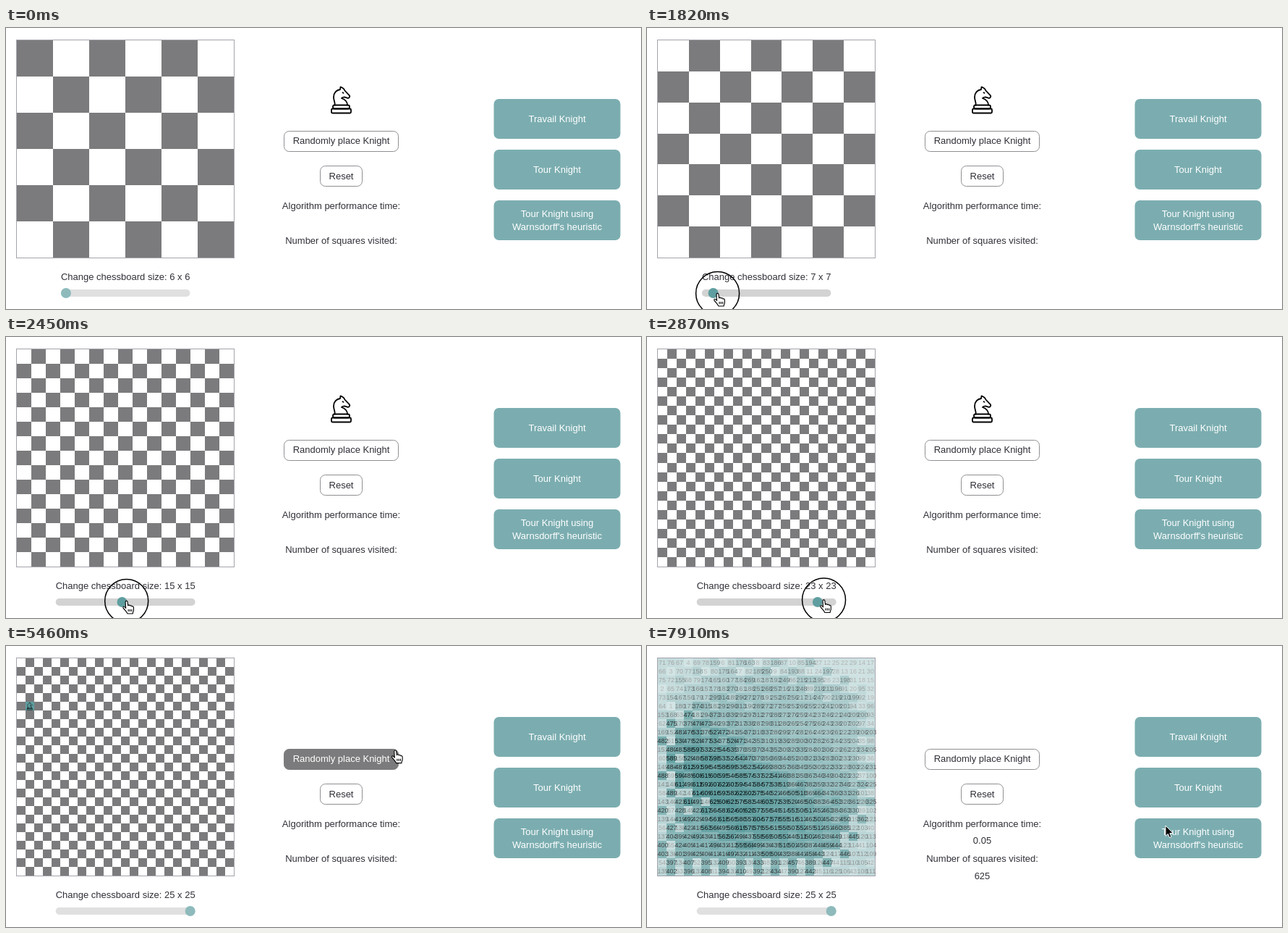
Write an HTML page that moves like this. It is 878 px wide and 388 px high and loops after 8 s.

```html
<!DOCTYPE html>
<html lang="en">
<head>
<meta charset="utf-8">
<title>Knight's tour</title>
<style>
html, body { margin: 0; width: 100%; height: 100%; overflow: hidden; background: #fff; }
svg { display: block; width: 878px; height: 388px; font: 13px "Liberation Sans", Arial, sans-serif; }
text { text-anchor: middle; fill: #303038; }
.number { font-size: 9px; fill: #000; }
.white { fill: #fff; }
.outline { fill: #fff; stroke: #8f8f94; }
</style>
</head>
<body>
<svg id="stage" viewBox="0 0 878 388">
  <defs>
    <g id="knight" fill="none" stroke="#000" stroke-width="1.8" stroke-linejoin="round" stroke-linecap="round">
      <path d="M6 26C7 22 4.500 20 4.500 15C4.500 9 8.500 5 13.500 4.500L14 .9C17 1.800 19 3.500 20 6L26.500 12.800C27.500 14.500 25.500 17 23.500 16.200L19.500 14.800C17.500 14.800 16.500 15.500 15.500 16.500C20 18 23.500 21 23.500 26"/>
      <path d="M17 8.800L18 9.300"/>
      <rect x="3.500" y="26" width="23" height="5" rx="2.300"/>
      <rect x="1.500" y="31" width="27" height="6" rx="1.500"/>
    </g>
  </defs>
  <rect x="14.500" y="16.500" width="301" height="301" fill="#fff" stroke="#a3a3ac"/>
  <path id="checks" fill="#7b7b7d"/>
  <g id="placed">
    <rect x="27" y="77" width="12" height="12" fill="#5f9ea0"/>
    <use href="#knight" transform="translate(28.500 77.700) scale(.29)"/>
  </g>
  <g id="tour"></g>

  <text id="sizeLabel" x="165.200" y="347.500"></text>
  <g id="slider">
    <rect id="track" y="361" height="10" rx="5" fill="#d3d3d3"/>
    <circle id="thumb" cy="366" r="7" fill="#5f9ea0"/>
  </g>

  <use id="spare" href="#knight" x="448.500" y="80.500"/>
  <rect id="placeBox" class="outline" x="384.500" y="142.500" width="158" height="28" rx="7"/>
  <text id="placeText" x="463.500" y="160.300">Randomly place Knight</text>
  <rect class="outline" x="434.500" y="190.500" width="58" height="28" rx="7"/>
  <text x="463.500" y="208.800">Reset</text>
  <text x="463.500" y="249.500">Algorithm performance time:</text>
  <text x="463.500" y="298">Number of squares visited:</text>
  <g id="results">
    <text x="463.500" y="273">0.05</text>
    <text x="463.500" y="321.500">625</text>
  </g>

  <g fill="#7badb0">
    <rect x="674.500" y="98" width="175" height="55" rx="7"/>
    <rect x="674.500" y="168" width="175" height="55" rx="7"/>
    <rect x="674.500" y="238" width="175" height="55" rx="7"/>
    <rect id="hover" x="674.500" y="238" width="175" height="55" rx="7" fill="#5b9a9d"/>
  </g>
  <text class="white" x="762" y="129.500">Travail Knight</text>
  <text class="white" x="762" y="199.500">Tour Knight</text>
  <text class="white" x="762" y="260.500">Tour Knight using</text>
  <text class="white" x="762" y="278.500">Warnsdorff's heuristic</text>

  <g id="pointer">
    <circle id="ring" fill="none" stroke="#000" stroke-width="1.500"/>
    <path id="arrow" d="M0 0V14.500L3.300 11.400 5.600 16.600 8 15.600 5.800 10.500H10.300Z" stroke="#fff"/>
    <g id="hand" stroke="#000" stroke-width="1.100" stroke-linejoin="round">
      <path fill="#fff" d="M-1.600 1.400C-1.600-.6 1.200-.6 1.400 1.400L2 6.500C2.600 5.200 4.600 5.400 4.800 6.800 5.600 5.800 7.300 6.200 7.400 7.600 8.400 7 9.800 7.600 9.800 9V12.500C9.800 14.500 8.600 15 8.600 17.500H1.200C.8 15.500-2.600 12.500-4.600 9.600-5.600 8-3.600 7-2.400 8.400L-1 10Z"/>
      <path d="M2.500 11.500V14.500M4.800 11.500V14.500M7.100 11.500V14.500"/>
    </g>
  </g>
</svg>
<script>
const LOOP = 8000, PLACED = 4880, SOLVED = 6580;
const el = {};
document.querySelectorAll('[id]').forEach(node => el[node.id] = node);

// Each track is a list of [time, value, ...].
const CURSOR = [
  [210, 172, 386], [350, 130, 357], [490, 82, 353], [600, 75, 366], [700, 92, 371], [910, 93, 372],
  [1050, 90, 371], [1190, 83, 366], [1670, 83, 366], [1820, 97.5, 366.5], [2450, 166.5, 364.5],
  [2870, 244.5, 363], [3220, 262, 362], [3430, 264, 362], [3570, 267, 360], [3710, 267, 360],
  [3900, 300, 336], [4150, 410, 250], [4380, 506, 167], [4550, 527, 151], [5390, 527, 151],
  [5460, 538, 144], [5620, 592, 164], [5820, 660, 226], [6000, 704, 244], [6160, 717, 248]
];
const SIZE = [[1670, 6], [1820, 7], [2450, 15], [2870, 23], [3220, 25]];
const RING = [
  [1190, 0], [1330, 30], [3300, 30], [3360, 23], [3500, 0],
  [4790, 0], [4880, 25], [4970, 0], [6390, 0], [6480, 29], [6610, 0]
];
const SLIDER_GLOW = [[490, .7], [690, 1], [3430, 1], [3570, .7]];
const BUTTON_GLOW = [[5860, 0], [6060, 1], [SOLVED, 1], [6930, 0]];

function sample(track, t) {
  const next = track.findIndex(key => key[0] > t);
  if (next === 0) return track[0].slice(1);
  if (next < 0) return track[track.length - 1].slice(1);
  const a = track[next - 1], b = track[next];
  const f = (t - a[0]) / (b[0] - a[0]);
  return a.slice(1).map((v, i) => v + (b[i + 1] - v) * f);
}

const edge = (i, n) => Math.round(i * 300 / n);

function checkerboard(n) {
  let d = '';
  for (let row = 0; row < n; row++)
    for (let col = n + row & 1; col < n; col += 2)
      d += `M${15 + edge(col, n)} ${17 + edge(row, n)}H${15 + edge(col + 1, n)}V${17 + edge(row + 1, n)}H${15 + edge(col, n)}Z`;
  return d;
}

// Warnsdorff's rule: always step to the free square with the fewest onward moves.
function knightsTour(n, x, y) {
  const jumps = [[2, -1], [2, 1], [-2, -1], [-2, 1], [1, -2], [1, 2], [-1, -2], [-1, 2]];
  const order = Array.from({ length: n }, () => Array(n).fill(0));
  const moves = (px, py) => jumps.map(([dx, dy]) => [px + dx, py + dy])
    .filter(([cx, cy]) => order[cy] && order[cy][cx] === 0);
  for (let step = 1; ; step++) {
    order[y][x] = step;
    let best = null, fewest = 9;
    for (const move of moves(x, y)) {
      const onward = moves(...move).length;
      if (onward < fewest) { fewest = onward; best = move; }
    }
    if (!best) return order;
    [x, y] = best;
  }
}

function drawTour(n) {
  let cells = '';
  knightsTour(n, 1, 5).forEach((line, row) => line.forEach((step, col) => {
    if (!step) return;
    const x = 15 + edge(col, n), y = 17 + edge(row, n);
    const anchor = step > 99 ? `x="${x - .5}" style="text-anchor:start"` : `x="${x + 6}"`;
    cells += `<g opacity="${(.27 + .73 * step / (n * n)).toFixed(3)}">` +
      `<rect x="${x}" y="${y}" width="12" height="12" fill="#5f9ea0"/>` +
      `<text class="number" ${anchor} y="${y + 9}">${step}</text></g>`;
  }));
  el.tour.innerHTML = cells;
}

const show = (node, on) => node.setAttribute('display', on ? 'inline' : 'none');
const set = (node, attrs) => Object.entries(attrs).forEach(([k, v]) => node.setAttribute(k, v));
let shownSize = 0;

function drawSize(n) {
  if (n === shownSize) return;
  shownSize = n;
  const width = n < 10 ? 178.5 : 193, left = 165.2 - width / 2;
  set(el.checks, { d: checkerboard(n) });
  el.sizeLabel.textContent = `Change chessboard size: ${n} x ${n}`;
  set(el.track, { x: left, width });
  set(el.thumb, { cx: left + 7 + (n - 6) / 19 * (width - 14) });
}

function render(t) {
  drawSize(Math.round(sample(SIZE, t)[0]));
  set(el.slider, { opacity: sample(SLIDER_GLOW, t)[0] });

  const solved = t >= SOLVED, placed = t >= PLACED;
  show(el.spare, !placed);
  show(el.placed, placed && !solved);
  show(el.checks, !solved);
  show(el.tour, solved);
  show(el.results, solved);

  const [x, y] = sample(CURSOR, t);
  const overPlace = x > 384 && x < 543 && y > 142 && y < 171;
  set(el.placeBox, { style: overPlace ? 'fill:#7b7b7d;stroke:#7b7b7d' : '' });
  set(el.placeText, { class: overPlace ? 'white' : '' });
  set(el.hover, { opacity: sample(BUTTON_GLOW, t)[0] });

  const hand = overPlace || (t >= 490 && t < 3460) || (t >= 5880 && t < SOLVED);
  show(el.pointer, t >= 200);
  set(el.pointer, { transform: `translate(${x} ${y})` });
  show(el.hand, hand);
  show(el.arrow, !hand);
  const radius = sample(RING, t)[0];
  show(el.ring, radius > 0);
  set(el.ring, { r: radius });
}

drawTour(25);
const start = performance.now();
function tick() {
  render((performance.now() - start) % LOOP);
  requestAnimationFrame(tick);
}
tick();
</script>
</body>
</html>
```
